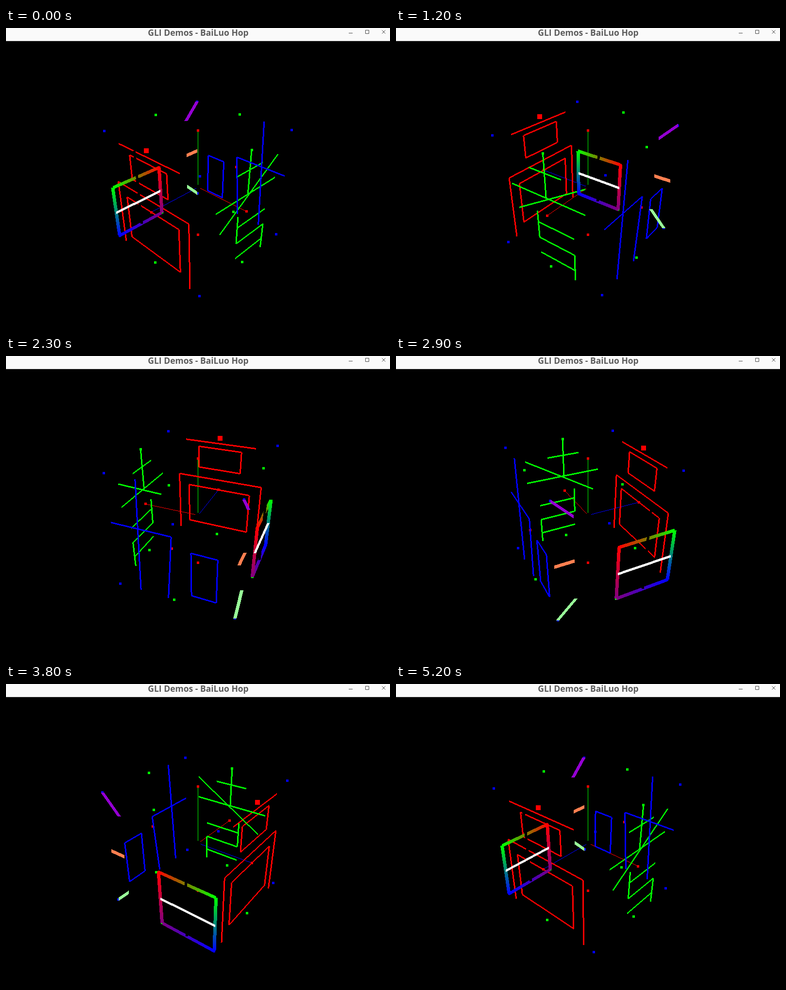
These frames come from a looping animation (791 px wide and 616 px high, 5.3 s). An HTML page with a canvas:

```html
<!DOCTYPE html>
<html lang="en">
<head>
<meta charset="utf-8">
<title>GLI Demos - BaiLuo Hop</title>
<style>
  html, body { margin: 0; width: 100%; height: 100%; overflow: hidden; background: #000; }
  canvas { position: absolute; left: 0; top: 0; display: block; }
  .bar {
    position: absolute; left: 0; top: 0; width: 791px; height: 26px;
    background: #fafafa; border-bottom: 1px solid #cfcfcf;
  }
  .title {
    position: absolute; left: 0; top: -3px; width: 792px; text-align: center;
    font: bold 17.5px/24px "Open Sans", "Noto Sans", sans-serif; color: #5c5c5c; white-space: nowrap;
  }
  .bar svg { position: absolute; left: 700px; top: 0; }
</style>
</head>
<body>
<canvas id="stage" width="791" height="616"></canvas>
<div class="bar">
  <div class="title">GLI Demos - BaiLuo Hop</div>
  <svg width="91" height="26" fill="none" stroke="#4a4a4a">
    <path d="M6 10.5h8M40.5 4.5h7v7h-7zM74.5 4.5l7 7M81.5 4.5l-7 7"/>
  </svg>
</div>
<script>
const ctx = document.getElementById("stage").getContext("2d");

const LOOP = 5300, STEP = 100;
const START_ANGLE = 44.2 * Math.PI / 180, STEP_ANGLE = 0.12;

// Camera at (0, 3, 5) looking at the origin, 45 degree field of view.
const DIST = Math.hypot(3, 5), SIN = 3 / DIST, COS = 5 / DIST;
const FOCAL = 300 / Math.tan(Math.PI / 8);
const CX = 395.98, CY = 326.95;

const RED = [255, 0, 0], GREEN = [0, 255, 0], BLUE = [0, 0, 255], PURPLE = [128, 0, 128];
const VIOLET = [148, 0, 211], CORAL = [255, 127, 80], PALE = [152, 251, 152];
const WHITE = [255, 255, 255], BLACK = [0, 0, 0];

let cosA = 1, sinA = 0;

function project([x, y, z]) {
  const rx = x * cosA - z * sinA;
  const rz = x * sinA + z * cosA;
  const w = 1 / (DIST - y * SIN - rz * COS);
  return { x: CX + FOCAL * rx * w, y: CY - FOCAL * (y * COS - rz * SIN) * w, w };
}

const css = c => `rgb(${c.map(Math.round).join(",")})`;

function dot(point, size, color) {
  const p = project(point);
  ctx.fillStyle = css(color);
  ctx.fillRect(Math.round(p.x - size / 2), Math.round(p.y - size / 2), size, size);
}

// Aliased wide line: the width is measured along the minor axis.
function line(from, to, width, color, endColor = color) {
  let p = project(from), q = project(to);
  const steep = Math.abs(q.y - p.y) > Math.abs(q.x - p.x);
  const major = steep ? "y" : "x", minor = steep ? "x" : "y";
  if (p[major] > q[major]) {
    [p, q] = [q, p];
    [color, endColor] = [endColor, color];
  }
  ctx.fillStyle = css(color);
  const end = Math.round(q[major]);
  for (let i = Math.round(p[major]); i < end; i++) {
    const t = (i + 0.5 - p[major]) / (q[major] - p[major]);
    const side = Math.round(p[minor] + (q[minor] - p[minor]) * t - width / 2);
    if (color !== endColor) {
      const k = t * q.w / ((1 - t) * p.w + t * q.w);
      ctx.fillStyle = css(color.map((c, n) => c + (endColor[n] - c) * k));
    }
    if (steep) ctx.fillRect(side, i, width, 1);
    else ctx.fillRect(i, side, 1, width);
  }
}

// Each path lists flat coordinate pairs on one face of the cube.
function strokes(paths, place, color) {
  for (const path of paths)
    for (let i = 0; i + 3 < path.length; i += 2)
      line(place(path[i], path[i + 1]), place(path[i + 2], path[i + 3]), 3, color);
}

const rect = (l, t, r, b) => [l, t, r, t, r, b, l, b, l, t];

const front = [
  [-0.65, 0.9, 0.65, 0.9],
  rect(-0.4, 0.8, 0.4, 0.4),
  [-0.8, -1, -0.8, 0.2, 0.8, 0.2, 0.8, -1],
  rect(-0.6, 0, 0.6, -0.8)
];
const right = [
  [0, 1, 0, 0.3],
  [-0.3, 0.7, 0.3, 0.7],
  [-0.7, 0.3, 0.7, 0.3],
  [-0.7, 0.7, 0.6, -0.1],
  [0.2, 0, 0.2, -0.5, -0.5, -0.5, -0.5, -1],
  [-0.5, -0.2, 0.2, -0.2],
  [-0.5, -0.8, 0.2, -0.8]
];
const back = [
  rect(-0.3, 0, -0.7, -0.8),
  [0.5, 1, 0.6, -1],
  [1, 0.2, 0, 0.2, 0.1, -1]
];

function drawAxes() {
  line([0.05, 0, 0], [1, 0, 0], 1, RED);
  line([0, 0.05, 0], [0, 1, 0], 1, GREEN);
  line([0, 0, 0.05], [0, 0, 1], 1, BLUE);
}

// Face centres are red, horizontal edge centres green, corners blue.
function drawLattice() {
  const units = [-1, 0, 1];
  for (const x of units) for (const y of units) for (const z of units) {
    const order = Math.abs(x) + Math.abs(y) + Math.abs(z);
    if (order === 1) dot([x, y, z], 5, RED);
    else if (order === 2 && y) dot([x, y, z], 5, GREEN);
    else if (order === 3) dot([x, y, z], 5, BLUE);
  }
}

function drawLeft() {
  const at = (z, y) => [-1, y, z];
  line(at(-1, 1), at(-0.7, 0.7), 7, VIOLET);
  line(at(-1, 0), at(-0.7, 0), 7, CORAL);
  line(at(-1, -1), at(-0.7, -0.7), 7, PALE);

  const corners = [[0, 0, RED], [1, 0, GREEN], [1, -1, BLUE], [0, -1, PURPLE]];
  corners.forEach(([z, y, color], i) => {
    const [z2, y2, color2] = corners[(i + 1) % 4];
    line(at(z, y), at(z2, y2), 7, color, color2);
  });
  line(at(0.5, 0.5), at(0.5, -1), 5, BLACK);
  line(at(0, -0.5), at(1, -0.5), 5, WHITE);
}

function draw(step) {
  const angle = START_ANGLE + STEP_ANGLE * step;
  cosA = Math.cos(angle);
  sinA = Math.sin(angle);
  ctx.fillStyle = "#000";
  ctx.fillRect(0, 0, 791, 616);
  drawAxes();
  drawLattice();
  dot([0, 1, 1], 10, RED);
  strokes(front, (x, y) => [x, y, 1], RED);
  strokes(right, (z, y) => [1, y, z], GREEN);
  strokes(back, (x, y) => [x, y, -1], BLUE);
  drawLeft();
}

let shown = -1;
function tick() {
  const step = Math.floor(performance.now() % LOOP / STEP);
  if (step !== shown) draw(shown = step);
  requestAnimationFrame(tick);
}
tick();
</script>
</body>
</html>
```
